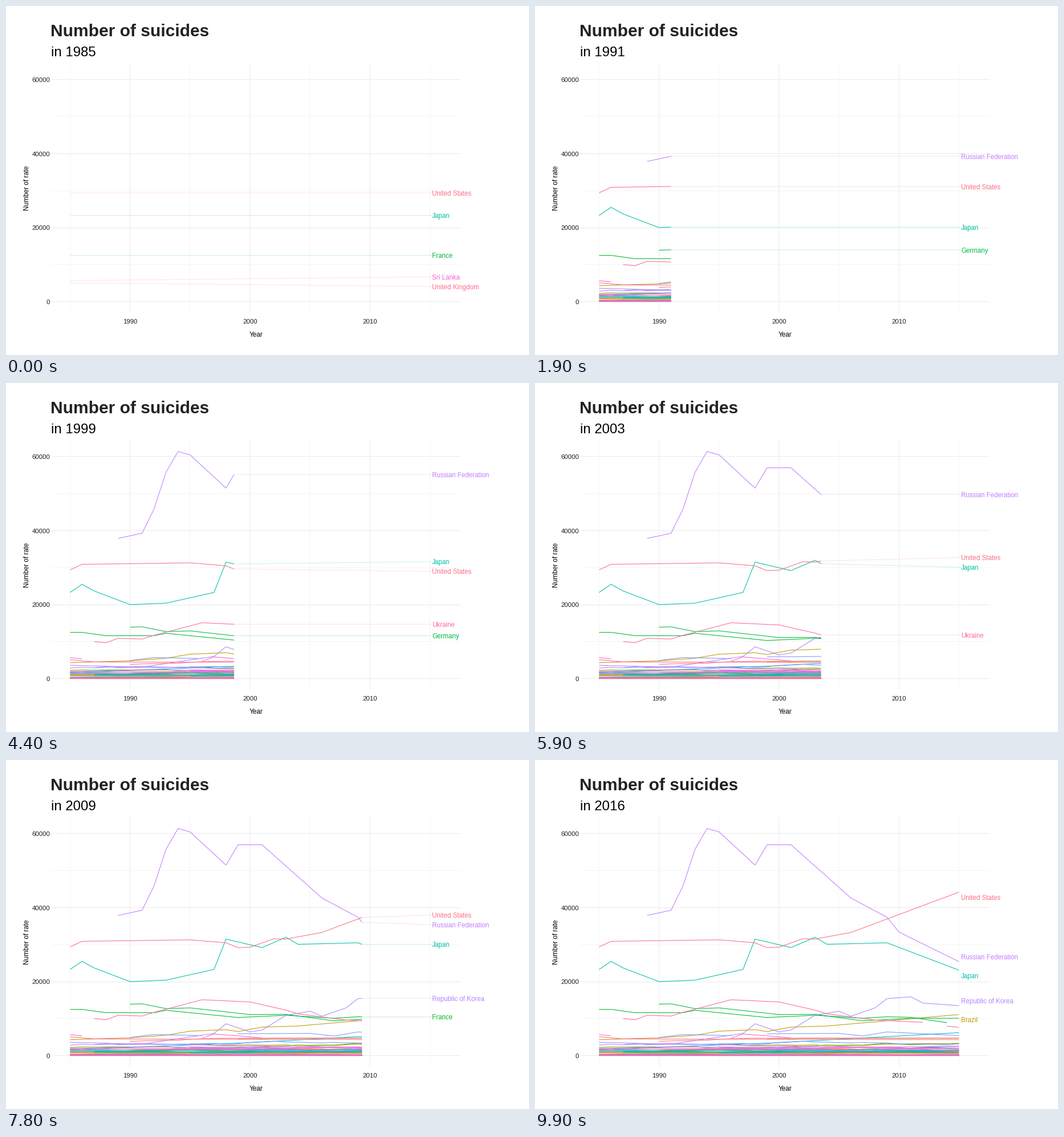
These frames come from a looping animation (917x611 px, 10000 ms). A matplotlib script:

```python
import numpy as np
import matplotlib.pyplot as plt
from matplotlib.animation import FuncAnimation

W, H, DPI = 917, 611, 64
FRAMES, COUNTRIES, START, YEARS = 100, 101, 1985, 31
PT = 72 / DPI
LABEL_X, GAP = 746.5, 16.9
gap = np.nan

plt.rcParams["font.family"] = "Liberation Sans"

# Name: (alphabetical position, turning points as year since START and thousands)
TURNS = {
    "Brazil": (15, [(0, 4.3), (5, 4.8), (8, 5.5), (10, 6.6), (13, 7), (14, 6.5),
                    (16, 7.7), (19, 8), (24, 9.4), (30, 11.1)]),
    "France": (33, [(0, 12.5), (1, 12.5), (3, 11.6), (7, 11.6), (8, 12.25), (14, 10.3),
                    (18, 10.9), (22, 10.1), (24, 10.5), (26, 10.35), (29, 8.9)]),
    "Germany": (35, [(5, 13.9), (6, 14), (8, 12.7), (10, 12.9), (15, 11.1),
                     (18, 11.15), (22, 9.4), (26, 10.1), (30, 10.1)]),
    "Japan": (46, [(0, 23.3), (1, 25.5), (2, 23.7), (5, 20), (8, 20.4), (12, 23.3),
                   (13, 31.5), (16, 29.2), (18, 32), (19, 30.1), (24, 30.5), (30, 23.1)]),
    "Mexico": (58, [(0, 1.6), (15, 3.5), (30, 6.2)]),
    "Poland": (69, [(5, 4.9), (7, 5.7), (11, 5.4), (12, gap), (14, 5.9), (20, 6),
                    (22, 5.3), (24, 6.4), (30, 5.4)]),
    "Republic of Korea": (73, [(0, 3.6), (6, 3.1), (12, 6), (13, 8.6), (15, 6.4),
                               (16, 6.9), (18, 10.9), (20, 12), (21, 10.65), (23, 12.9),
                               (24, 15.4), (26, 15.9), (27, 14.2), (30, 13.5)]),
    "Russian Federation": (75, [(4, 37.9), (6, 39.3), (7, 45.9), (8, 55.8), (9, 61.4),
                                (10, 60.5), (13, 51.5), (14, 57), (16, 57), (21, 42.6),
                                (24, 37.4), (25, 33.4), (30, 25.4)]),
    "Sri Lanka": (87, [(0, 5.67), (1, 5.33), (2, gap), (11, 4.7), (12, 5.85), (16, 4.8)]),
    "Ukraine": (95, [(2, 10), (3, 9.7), (4, 10.9), (6, 10.7), (7, 11.7), (11, 15.1),
                     (15, 14.5), (18, 12.3), (19, 11.3), (23, 9.6), (27, 9), (28, gap),
                     (29, 8), (30, 7.6)]),
    "United Kingdom": (97, [(0, 5.1), (2, 4.5), (30, 4.3)]),
    "United States": (98, [(0, 29.4), (1, 30.9), (10, 31.3), (13, 30.5), (14, 29.2),
                           (15, 29.3), (17, 31.6), (18, 31.5), (21, 33.3), (30, 44.2)]),
}
NAMES = {i: name for name, (i, _) in TURNS.items()}


def hue(i):
    """Evenly spaced HCL hue with chroma 100 and luminance 65."""
    h = np.radians(15 + 360 * i / COUNTRIES)
    L, C = 65, 100
    Y = ((L + 16) / 116) ** 3
    u = C * np.cos(h) / (13 * L) + 0.19784
    v = C * np.sin(h) / (13 * L) + 0.46834
    X = 9 * Y * u / (4 * v)
    Z = 3 * Y / v - 5 * Y - X / 3
    rgb = np.array([[3.2405, -1.5371, -0.4985],
                    [-0.9693, 1.8760, 0.0416],
                    [0.0556, -0.2040, 1.0572]]) @ [X, Y, Z]
    rgb = np.clip(rgb, 0, 1)
    return np.where(rgb > 0.0031308, 1.055 * rgb ** (1 / 2.4) - 0.055, 12.92 * rgb)


def build_data():
    rng = np.random.default_rng(7)
    ks = np.arange(YEARS)
    # Small countries: log-uniform size, gently wandering, some starting late
    size = 10 ** rng.uniform(0.3, 3.6, (COUNTRIES, 1))
    walk = np.cumsum(rng.normal(0, 0.045, (COUNTRIES, YEARS)), axis=1)
    data = np.minimum(size * np.exp(walk), 4700)
    late = rng.choice([0, 0, 0, 2, 5, 10, 14], (COUNTRIES, 1))
    data[ks < late] = gap
    for i, turns in TURNS.values():
        k, v = zip(*turns)
        data[i] = 1000 * np.interp(ks, k, v, left=gap, right=gap)
    return data


def leaders_of(k):
    return set(sorted(NAMES, key=lambda i: -np.nan_to_num(DATA[i, k]))[:5])


DATA = build_data()
COLORS = [hue(i) for i in range(COUNTRIES)]
KEYS = np.rint(np.arange(YEARS + 1) * (FRAMES - 1) / YEARS)
TOP = [leaders_of(k) for k in range(YEARS)]


def px(k):
    return 111.9 + 21.03 * k


def py(v):
    return 517 - 0.006475 * v


fig = plt.figure(figsize=(W / DPI, H / DPI), dpi=DPI, facecolor="white")
ax = fig.add_axes([0, 0, 1, 1])
ax.set_xlim(-0.5, W - 0.5)
ax.set_ylim(H - 0.5, -0.5)
ax.axis("off")


def text(x, y, s, size, **kw):
    return ax.text(x, y, s, fontsize=size * PT, va="baseline", **kw)


def stroke(xs, ys, color, width=1.07, **kw):
    return ax.plot(xs, ys, color=color, lw=width * PT, snap=False,
                   solid_capstyle="butt", **kw)[0]


def grid(ks, values, width):
    for x in np.rint(px(ks)):
        stroke([x, x], [99.5, 536], "#EBEBEB", width, zorder=0)
    for y in np.rint(py(values)):
        stroke([79.5, 796.5], [y, y], "#EBEBEB", width, zorder=0)


grid(np.arange(0, 31, 10), np.arange(10000, 60000, 20000), 0.53)
grid(np.arange(5, 31, 10), np.arange(0, 70000, 20000), 1.07)
for v in range(0, 70000, 20000):
    text(76.8, py(v) + 4.2, str(v), 11.3, ha="right", color="#1A1A1A")
for year in (1990, 2000, 2010):
    text(px(year - START), 555.2, str(year), 11.3, ha="center", color="#1A1A1A")
text(437.7, 578.7, "Year", 11.7, ha="center")
text(39.7, 318, "Number of rate", 11.7, ha="center", rotation=90, rotation_mode="anchor")
text(77.8, 52.2, "Number of suicides", 30, weight="bold", color="#222222")
subtitle = text(78.2, 87.2, "", 24)

lines = [stroke([], [], c, zorder=2) for c in COLORS]
leaders = {i: stroke([], [], COLORS[i], alpha=0.2, zorder=3) for i in NAMES}
labels = {i: text(LABEL_X, 0, n, 11.5, color=COLORS[i], zorder=4)
          for i, n in NAMES.items()}


def spread(ys):
    """Push sorted label heights apart until none overlap."""
    out = np.array(ys, float)
    for _ in range(30):
        for j in range(len(out) - 1):
            lack = max(GAP - (out[j + 1] - out[j]), 0)
            out[j] -= lack / 2
            out[j + 1] += lack / 2
    return out


def draw(f):
    pos = min(np.interp(f, KEYS, np.arange(YEARS + 1)), YEARS - 1)
    k = int(pos + 1e-9)
    nxt = min(k + 1, YEARS - 1)
    done = k == YEARS - 1
    now = DATA[:, k] + (pos - k) * (DATA[:, nxt] - DATA[:, k])
    subtitle.set_text(f"in {round(START + YEARS * f / (FRAMES - 1))}")

    xs = px(np.append(np.arange(k + 1), pos))
    for i, line in enumerate(lines):
        line.set_data(xs, py(np.append(DATA[i, :k + 1], now[i])))

    for artist in (*labels.values(), *leaders.values()):
        artist.set_visible(False)
    shown = sorted(TOP[k] & TOP[nxt], key=lambda i: -now[i])
    ends = [py(now[i]) for i in shown]
    # at the end, labels dodge the line ends, alternately below and above
    spots = [y + 9 * (-1) ** j for j, y in enumerate(ends)] if done else spread(ends)
    for i, end, spot in zip(shown, ends, spots):
        labels[i].set_y(spot + 4.7)
        labels[i].set_visible(True)
        leaders[i].set_data([px(pos), LABEL_X - 1.5], [end, spot])
        leaders[i].set_visible(not done)
    return []


anim = FuncAnimation(fig, draw, frames=FRAMES, interval=100, repeat=True,
                     repeat_delay=0, blit=False)
plt.show()
```
